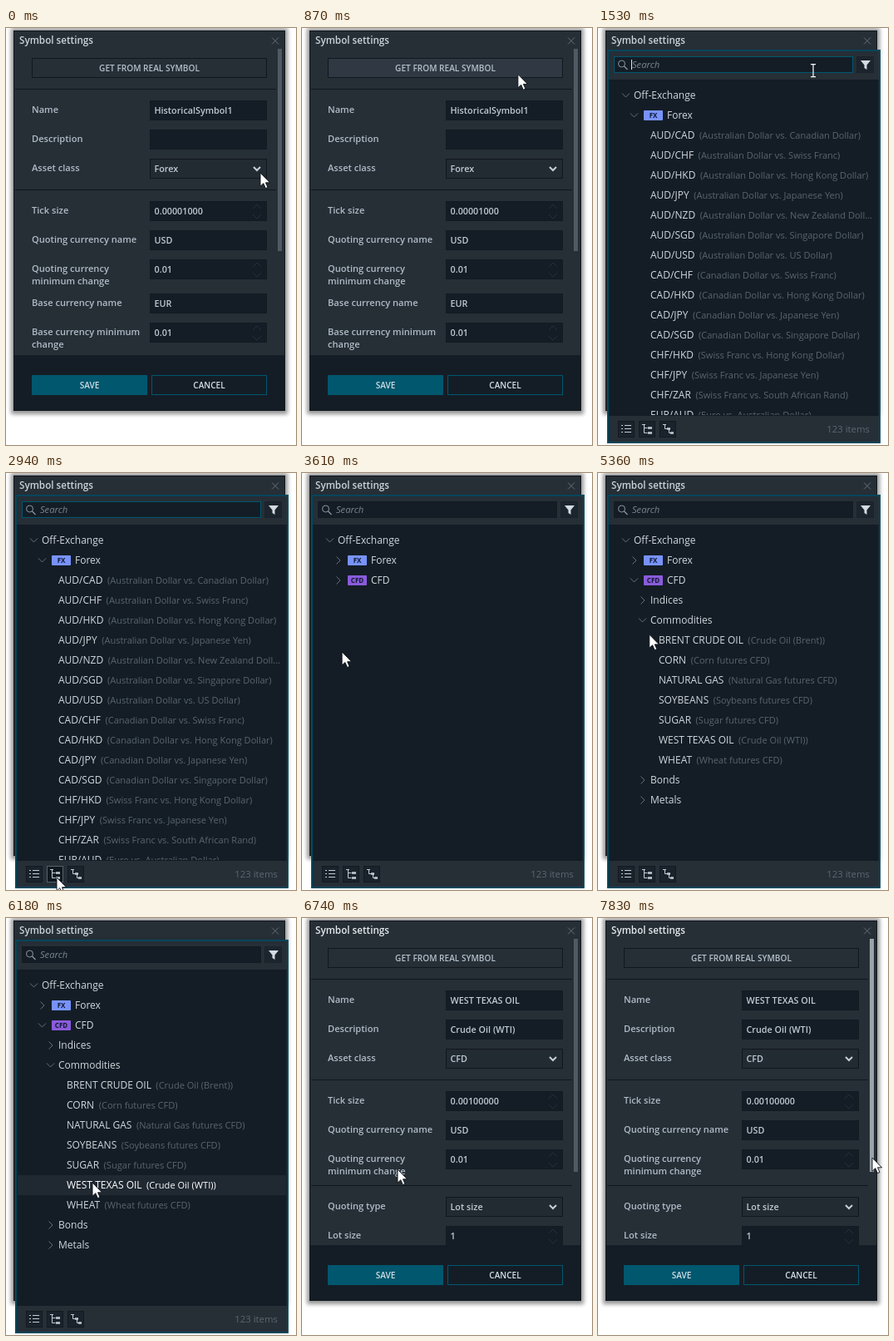
These frames come from a looping animation (349 by 501 pixels, 7.99 s). An HTML page:

```html
<!DOCTYPE html>
<html lang="en">
<head>
<meta charset="utf-8">
<title>Symbol settings</title>
<style>
  html, body { margin: 0; width: 100%; height: 100%; overflow: hidden; background: #fff; }
  svg { display: block; width: 349px; height: 501px; }
  text { font-family: "Open Sans", "Noto Sans", sans-serif; white-space: pre; }
  .title { font-size: 11.7px; font-weight: 600; fill: #cbd3da; }
  .label { font-size: 11.1px; font-weight: 600; fill: #b0bcc7; }
  .value { font-size: 10.8px; font-weight: 600; fill: #c0cad3; }
  .button { font-size: 10.1px; font-weight: 600; fill: #b4c0ca; text-anchor: middle; }
  .name { font-size: 12px; fill: #d0d7dd; }
  .note { font-size: 11.05px; fill: #5a646d; }
  .badge { font-size: 8px; font-weight: 700; fill: #101830; text-anchor: middle; }
  .hint { font-size: 11.2px; font-style: italic; fill: #7b868f; }
  .count { font-size: 11.4px; fill: #5d6770; text-anchor: end; }
  .picked .name, .picked .note { fill: #fff; }
</style>
</head>
<body>
<svg id="stage" viewBox="0 0 349 501" xmlns="http://www.w3.org/2000/svg">
  <defs>
    <filter id="soft" x="-10%" y="-10%" width="120%" height="120%"><feGaussianBlur stdDeviation="2.6"/></filter>
    <clipPath id="formArea"><rect x="9" y="3" width="327" height="390"/></clipPath>
    <clipPath id="listArea"><rect x="13" y="62" width="325" height="403"/></clipPath>
  </defs>
</svg>
<script>
const LOOP = 7990;
const PANEL = '#262e36', DARK = '#141d26', EDGE = '#10171e', TEAL = '#00576e';
const stage = document.getElementById('stage');

function add(parent, tag, attrs = {}, content) {
  const node = document.createElementNS('http://www.w3.org/2000/svg', tag);
  for (const key in attrs) node.setAttribute(key, attrs[key]);
  if (content !== undefined) node.textContent = content;
  return parent.appendChild(node);
}
const group = (parent, attrs) => add(parent, 'g', attrs);
const box = (parent, x, y, width, height, fill, more) =>
  add(parent, 'rect', { x, y, width, height, fill, ...more });
const frame = (parent, x, y, w, h, fill, stroke) =>
  box(parent, x + .5, y + .5, w - 1, h - 1, fill, { stroke });
const line = (parent, d, stroke, width = 1) =>
  add(parent, 'path', { d, fill: 'none', stroke, 'stroke-width': width });
const write = (parent, cls, x, y, content) => add(parent, 'text', { class: cls, x, y }, content);
const show = (node, on) => node.setAttribute('display', on ? 'inline' : 'none');

// Dialog
box(stage, 6, 0, 333, 464, '#000', { opacity: .42, filter: 'url(#soft)' });
frame(stage, 9, 3, 327, 457, PANEL, EDGE);
const title = write(stage, 'title', 16, 19, 'Symbol settings');
line(stage, 'M320 11.5l8 8m0-8l-8 8', '#66707a');

const form = group(stage);
const getButton = frame(form, 31, 36, 283, 24, PANEL, EDGE);
write(form, 'button', 172.5, 51.5, 'GET FROM REAL SYMBOL');
const divider = (parent, y) => line(parent, `M11 ${y + .5}H325`, EDGE);
divider(form, 73);
divider(form, 194);

function field(parent, y, label, value, kind) {
  label.split('|').forEach((part, i) => write(parent, 'label', 31, y + 15 + i * 15, part));
  frame(parent, 173, y, 141, 24, kind === 'select' ? '#222a32' : DARK, kind === 'select' ? EDGE : '#121a22');
  if (value) write(parent, 'value', 178.5, y + 16, value);
  if (kind === 'select') line(parent, `M298 ${y + 10}l4 4l4-4`, '#c6cfd7', 2);
  if (kind === 'number') line(parent, `M297 ${y + 9}l5-5l5 5M297 ${y + 16}l5 5l5-5`, '#26303a');
}
function fields(rows) {
  const g = group(form, { 'clip-path': 'url(#formArea)' });
  rows.forEach(row => field(g, ...row));
  return g;
}
const before = fields([
  [87, 'Name', 'HistoricalSymbol1'],
  [122, 'Description', ''],
  [157, 'Asset class', 'Forex', 'select'],
  [208, 'Tick size', '0.00001000', 'number'],
  [243, 'Quoting currency name', 'USD'],
  [278, 'Quoting currency|minimum change', '0.01', 'number'],
  [319, 'Base currency name', 'EUR'],
  [354, 'Base currency minimum|change', '0.01', 'number']
]);
const after = fields([
  [87, 'Name', 'WEST TEXAS OIL'],
  [122, 'Description', 'Crude Oil (WTI)'],
  [157, 'Asset class', 'CFD', 'select'],
  [208, 'Tick size', '0.00100000', 'number'],
  [243, 'Quoting currency name', 'USD'],
  [278, 'Quoting currency|minimum change', '0.01', 'number'],
  [335, 'Quoting type', 'Lot size', 'select'],
  [370, 'Lot size', '1', 'number']
]);
divider(after, 321);
const thumb = box(form, 327, 25, 5, 243, '#515a63');
box(form, 10, 393, 325, 66, DARK);
box(form, 31, 417, 139, 24, TEAL);
frame(form, 175, 417, 139, 24, DARK, TEAL);
write(form, 'button', 100.5, 432.5, 'SAVE').style.fill = '#d3dee5';
write(form, 'button', 244.5, 432.5, 'CANCEL').style.fill = '#d3dee5';

// Symbol picker
const popup = group(stage);
box(popup, 11, 26, 329, 473, '#00465a');
box(popup, 13, 28, 325, 469, DARK);
box(popup, 13, 28, 325, 34, PANEL);
const search = frame(popup, 19, 34, 288, 20, DARK, TEAL);
add(popup, 'circle', { cx: 28.5, cy: 43, r: 4, fill: 'none', stroke: '#8d979f' });
line(popup, 'M31.5 46l4 4', '#8d979f', 1.2);
write(popup, 'hint', 41, 48, 'Search');
const caret = box(popup, 40, 38, 1, 12, '#e3e8ec');
frame(popup, 311, 34, 21, 20, '#1c252e', '#1a222a');
add(popup, 'path', { d: 'M316 39h12l-4.5 5.5v5.5l-3-2v-3.5z', fill: '#d3dae0' });

const BADGE = { Forex: ['FX', '#7893fb'], CFD: ['CFD', '#8a5bdc'] };

// Each row is [depth, state, name, note]; state is '+', '-' or '' for a leaf.
function tree(rows) {
  const g = group(popup, { 'clip-path': 'url(#listArea)' });
  rows.forEach(([depth, state, name, note], i) => {
    const y = 81 + i * 24, x = 33.5 + depth * 10;
    const row = group(g);
    if (name === 'WEST TEXAS OIL') {
      row.bar = box(row, 14, y - 12, 323, 24, '#202932');
      g.target = row;
    }
    if (state === '-') line(row, `M${x - 4.5} ${y - 2.5}l4.5 4.5l4.5-4.5`, '#66707a');
    if (state === '+') line(row, `M${x - 2} ${y - 4.5}l4.5 4.5l-4.5 4.5`, '#66707a');
    const badge = BADGE[name];
    if (badge) {
      box(row, 55, y - 6, 23, 12, badge[1], { rx: 1 });
      write(row, 'badge', 66.5, y + 3, badge[0]);
    }
    const text = write(row, 'name', badge ? 83 : x + 9.5, y + 4, name);
    if (note) add(text, 'tspan', { class: 'note', dx: 5.5 }, `(${note}`);
  });
  return g;
}
const MONEY = {
  AUD: 'Australian Dollar', CAD: 'Canadian Dollar', CHF: 'Swiss Franc', HKD: 'Hong Kong Dollar',
  JPY: 'Japanese Yen', SGD: 'Singapore Dollar', USD: 'US Dollar', ZAR: 'South African Rand', EUR: 'Euro'
};
const pairs = ('AUD/CAD AUD/CHF AUD/HKD AUD/JPY AUD/NZD AUD/SGD AUD/USD CAD/CHF CAD/HKD ' +
  'CAD/JPY CAD/SGD CHF/HKD CHF/JPY CHF/ZAR EUR/AUD').split(' ').map(pair => {
  const [a, b] = pair.split('/');
  return [2, '', pair, `${MONEY[a]} vs. ${b === 'NZD' ? 'New Zealand Doll...' : MONEY[b] + ')'}`];
});
const goods = [
  ['BRENT CRUDE OIL', 'Crude Oil (Brent))'], ['CORN', 'Corn futures CFD)'],
  ['NATURAL GAS', 'Natural Gas futures CFD)'], ['SOYBEANS', 'Soybeans futures CFD)'],
  ['SUGAR', 'Sugar futures CFD)'], ['WEST TEXAS OIL', 'Crude Oil (WTI))'],
  ['WHEAT', 'Wheat futures CFD)']
].map(item => [3, '', ...item]);
const root = [0, '-', 'Off-Exchange'], closedForex = [1, '+', 'Forex'];
const kinds = ['Indices', 'Commodities', 'Bonds', 'Metals'].map(name => [2, '+', name]);
const trees = [
  [1480, tree([root, [1, '-', 'Forex'], ...pairs])],
  [3090, tree([root, closedForex, [1, '+', 'CFD']])],
  [4180, tree([root, closedForex, [1, '-', 'CFD'], ...kinds])],
  [4940, tree([root, closedForex, [1, '-', 'CFD'], kinds[0], [2, '-', 'Commodities'], ...goods, kinds[2], kinds[3]])]
];
const target = trees[3][1].target;

box(popup, 13, 466, 325, 31, PANEL);
const tools = [24, 49, 74].map(x => frame(popup, x, 472, 20, 20, '#1a232b', '#121a21'));
const INK = '#c3ccd4';
line(popup, 'M28 477.5h2m2 0h8M28 481.5h2m2 0h8M28 485.5h2m2 0h8', INK);
line(popup, 'M53 476.5h4M55.5 477v9.5h4M55.5 480.5h4', INK);
line(popup, 'M60 480.5h5M60 486.5h5', INK, 2.4);
line(popup, 'M78 476.5h4M80.5 477v4.5h3M85.5 482v4.5h2', INK);
line(popup, 'M83 481.5h4M87 486.5h4', INK, 2.4);
write(popup, 'count', 327, 486, '123 items');

// Pointer
const arrow = add(stage, 'path', {
  d: 'M0 0V16.2L3.8 12.7L6.4 18.6L9 17.5L6.5 11.8H11.6Z',
  fill: '#fff', stroke: '#0b0f13', 'stroke-width': .9
});
const beam = group(stage);
line(beam, 'M-3 -7.5h2.5l.5 .5l.5 -.5h2.5M0 -7V7M-3 7.5h2.5l.5 -.5l.5 .5h2.5', '#fff', 1.2);

const smooth = p => (1 - Math.cos(Math.PI * p)) / 2;
const settle = p => 1 - (1 - p) ** 2;
const steady = p => p;
// [time, x, y, easing into this point]
const PATH = [
  [0, 306, 174], [40, 306, 174], [840, 260, 56, smooth], [1020, 259, 51, smooth],
  [1480, 259, 51], [1940, 259, 52], [2770, 64, 489, smooth], [2940, 61, 486, steady],
  [3060, 61, 486], [3880, 44, 128, smooth], [4250, 42, 125, smooth], [4480, 42, 125],
  [4530, 51, 145, steady], [4860, 56, 177, settle], [5180, 56, 177], [5980, 104, 318, smooth],
  [6690, 104, 318], [6740, 115, 302, steady], [7470, 330, 203, smooth],
  [7610, 330, 203], [7830, 330, 288, settle], [LOOP, 330, 288]
];
function pointer(t) {
  const i = Math.max(1, PATH.findIndex(p => p[0] > t));
  const [t0, x0, y0] = PATH[i - 1], [t1, x1, y1, ease = steady] = PATH[i];
  const p = ease((t - t0) / (t1 - t0));
  return [x0 + (x1 - x0) * p, y0 + (y1 - y0) * p];
}

function draw(t) {
  const [x, y] = pointer(t);
  const over = (l, top, r, b) => x >= l && x <= r && y >= top && y <= b;
  const open = t >= 1480 && t < 6410, done = t >= 6410;

  show(popup, open);
  show(form, !open);
  show(before, !done);
  show(after, done);
  title.style.fill = done ? '#e4e9ed' : '';
  thumb.setAttribute('height', done ? 280 : 243);
  thumb.setAttribute('fill', done && x > 325 ? '#9aa2aa' : '#515a63');
  const pressed = t >= 940 && t < 1020;
  getButton.setAttribute('fill', !over(31, 36, 314, 60) ? PANEL : pressed ? '#1d252d' : '#303943');

  const current = trees.filter(([from]) => t >= from).pop();
  trees.forEach(entry => show(entry[1], entry === current));
  const picked = t >= 6180;
  target.setAttribute('class', picked ? 'picked' : '');
  show(target.bar, picked);
  search.setAttribute('stroke', t < 3090 ? TEAL : '#121a22');
  show(caret, t < 3090 && Math.floor((t - 1480) / 486) % 2 === 0);
  const hover = over(49, 472, 69, 492);
  tools[1].setAttribute('fill', hover ? '#10181f' : '#1a232b');
  tools[1].setAttribute('stroke', hover ? '#56616b' : '#121a21');

  const typing = open && over(19, 34, 307, 54);
  show(beam, typing);
  show(arrow, !typing);
  const place = `translate(${x.toFixed(1)} ${y.toFixed(1)})`;
  arrow.setAttribute('transform', place);
  beam.setAttribute('transform', place);
}

const start = performance.now();
function tick() {
  draw((performance.now() - start) % LOOP);
  requestAnimationFrame(tick);
}
tick();
</script>
</body>
</html>
```
